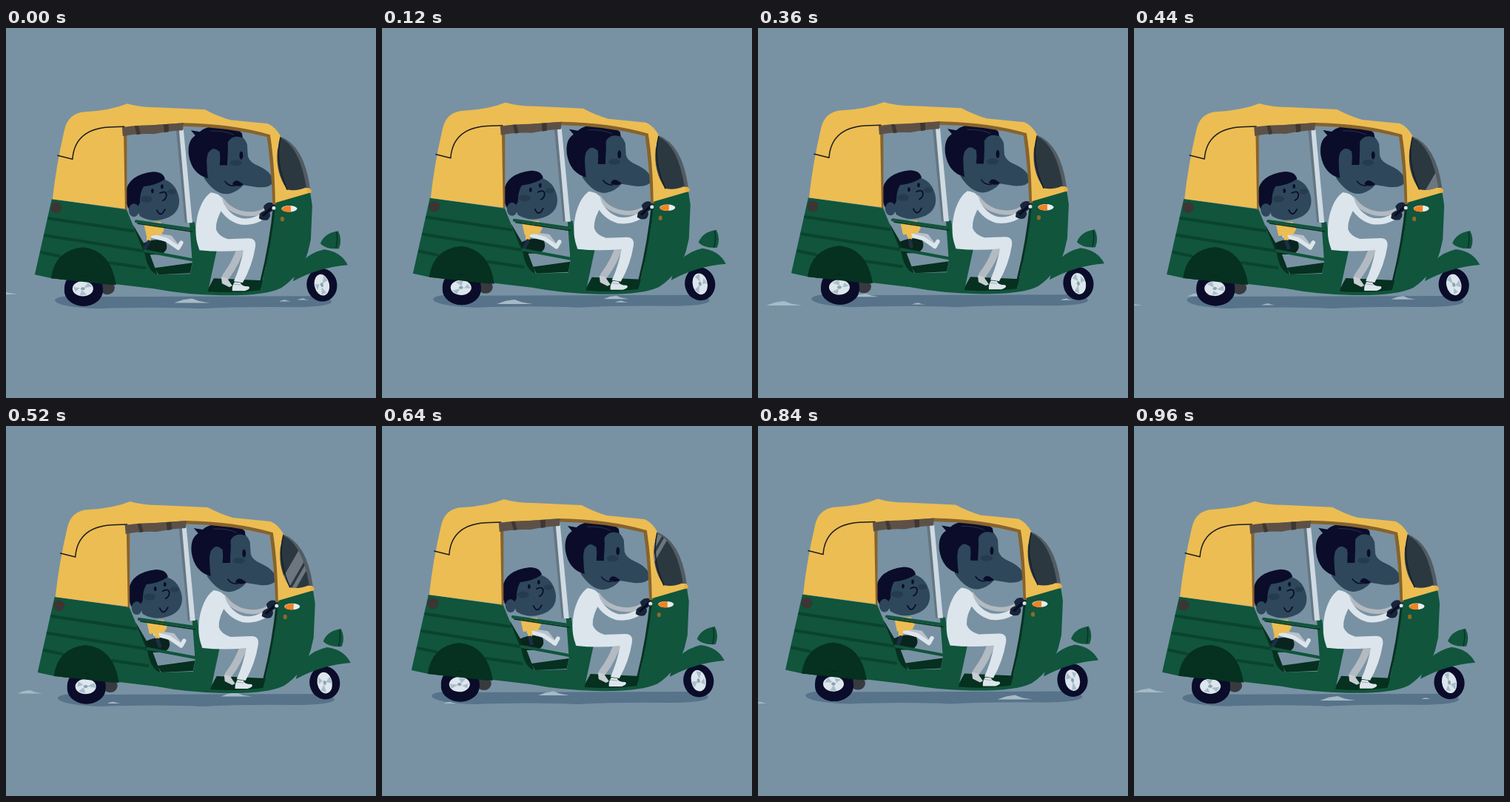
An HTML page for the animation above (1 s loop, 500 by 500 pixels).

```html
<!DOCTYPE html>
<html lang="en">
<head>
<meta charset="utf-8">
<title>Auto rickshaw ride</title>
<style>
html, body { margin: 0; width: 100%; height: 100%; overflow: hidden; background: #7892a3; }
svg { display: block; width: 100%; height: 100%; }
.green { fill: #10553c; }
.deep { fill: #06301f; }
.navy { fill: #0a0c2a; }
.skin { fill: #2e475b; }
.blush { fill: #263b4e; }
.white { fill: #dce5ec; }
.yellow { fill: #ecbd53; }
.line { fill: none; stroke-linecap: round; stroke-linejoin: round; }
</style>
</head>
<body>
<svg viewBox="0 0 500 500">
  <defs>
    <path id="glass" d="M371 148 Q397 160 406 215 Q392 221 380 218 Q364 195 367 165 Z"/>
    <clipPath id="pane"><use href="#glass"/></clipPath>
    <g id="hub">
      <circle r="10" fill="#dce6ec"/>
      <path d="M1 -1 L5 -8 L9 -3 Z M-1 2 L-3 9 L4 8 Z M-3 -1 L-9 -2 L-7 4 Z" fill="#a9bdca"/>
      <circle r="2" fill="#8aa2b2"/>
    </g>
  </defs>

  <path id="shadow" fill="#57738a" d="M66 368 Q68 360 105 363 L425 362 Q440 365 440 370 Q436 377 385 377 Q320 376 262 379 Q200 376 125 379 Q70 377 66 368 Z"/>
  <g id="streaks" fill="#a6bac7"></g>

  <g id="car">
    <ellipse cx="137" cy="351" rx="10" ry="9" fill="#383a40"/>
    <ellipse class="navy" cx="105" cy="351.500" rx="26" ry="24"/>

    <!-- cabin floor and seat -->
    <path class="deep" d="M270 358 L281 338 L348 341 L343 357 Z"/>
    <path class="deep" d="M172 266 L186 290 L194 304 L205 333 L188 334 Z"/>
    <path fill="#09241d" d="M185 291 Q204 282 216 289 Q221 300 209 306 L192 306 Z"/>

    <!-- child -->
    <path class="skin" d="M177 216 Q184 201 209 203 Q230 207 234 230 Q236 247 221 255 Q200 265 181 254 Q174 240 177 216 Z"/>
    <path class="navy" d="M162 222 Q165 198 199 194 Q213 194 215 204 Q204 212 186 214 Q181 222 181 236 L177 243 Q169 237 168 248 Q160 235 162 222 Z"/>
    <ellipse class="skin" cx="173" cy="246" rx="7" ry="9"/>
    <ellipse class="blush" cx="190" cy="231" rx="8" ry="4.500"/>
    <ellipse class="blush" cx="224" cy="221" rx="6" ry="3.500"/>
    <g class="navy"><ellipse cx="198" cy="220" rx="1.800" ry="3"/><ellipse cx="211" cy="214" rx="1.800" ry="3"/></g>
    <path class="line" d="M208 223 Q216 219 217 225 Q217 231 212 233 M204 246 Q209 257 215 245" stroke="#0a0c2a" stroke-width="1.700"/>
    <path class="line" d="M201 280 L222 283 L232 296" stroke="#b9c2ca" stroke-width="6"/>
    <path class="line" d="M198 281 L217 286 L233 297 L237 290" stroke="#dce5ec" stroke-width="5.500"/>
    <path class="yellow" d="M186 262 L209 262 L214 272 L210 279 L190 281 Z"/>
    <path id="sleeve" class="line" stroke="#ecbd53" stroke-width="6"/>
    <path id="forearm" class="line" stroke="#1d2f45" stroke-width="5"/>

    <!-- driver: far limbs -->
    <path class="line" d="M291 231 Q304 249 326 251 Q340 252 350 246" stroke="#b3bac1" stroke-width="6"/>
    <path class="line" d="M318 295 Q312 316 297 336" stroke="#b3bac1" stroke-width="10"/>
    <path d="M291 336 L299 338 L306 348 L302 350 L292 345 Z" fill="#c7cdd2"/>

    <!-- lower body -->
    <path class="green" d="M62 231 L39 333 L62 338 L149 346 L200 352 Q242 360 290 361 Q350 362 372 351 Q398 334 408 303 L412 286 L414 240 L411 220 L364 235 Q359 292 344 354 Q310 359 273 356 L285 300 L261 300 L255 262 L248 262 L252 318 L249 332 L205 333 Q192 329 188 306 L163 245 Z"/>
    <path class="deep" d="M201 324 L252 317 L249 331 L206 333 Z"/>
    <path class="line" d="M58 257 L172 274 M53 280 L185 301 M48 303 L72 308 M140 317 L188 324" stroke="#0b432f" stroke-width="4"/>
    <path class="line" d="M176 261 L252 272 M188 301 L252 313" stroke="#10553c" stroke-width="4"/>
    <path class="line" d="M178 264 L252 275" stroke="#06301f" stroke-width="1.500"/>
    <path class="line" d="M363 237 Q358 290 345 342" stroke="#073122" stroke-width="3"/>
    <path class="deep" d="M61 338 Q66 300 104 296 Q142 300 149 347 Z"/>
    <ellipse class="navy" cx="105" cy="355" rx="26" ry="20.500"/>
    <g transform="translate(104 352) scale(1.4 1.02)"><use href="#hub" class="spin"/></g>
    <path class="deep" d="M70 335 L144 335 L143 347 L71 339 Z"/>
    <circle cx="68" cy="242.500" r="7.500" fill="#3b3634"/>

    <!-- driver -->
    <path class="skin" d="M282 140 Q318 135 326 157 L327 173 Q329 181 341 186 Q361 195 361 208 Q358 216 340 215 L321 212 Q312 222 300 224 Q284 226 268 203 L270 160 Z"/>
    <path class="navy" d="M247 171 Q245 152 256 145 L250 138 L262 140 Q270 132 290 132 Q311 133 319 142 L320 148 Q306 143 300 154 L299 185 L290 185 L289 167 Q281 159 273 169 Q270 180 273 203 Q251 197 247 171 Z"/>
    <path class="line" d="M277 139 Q295 138 308 144" stroke="#27344c"/>
    <ellipse class="skin" cx="281" cy="179" rx="9.500" ry="16"/>
    <path class="navy" d="M290 164 L300 160 L299 185 L289 185 Z"/>
    <ellipse class="navy" cx="318" cy="172" rx="2.400" ry="5.500"/>
    <ellipse class="blush" cx="311" cy="182" rx="8" ry="4"/>
    <path class="navy" d="M306 211 Q309 204 315 207 L321 211 Q315 216 306 211 Z"/>
    <path class="line" d="M296 207 Q301 214 309 213" stroke="#0a0c2a" stroke-width="1.500"/>
    <path class="white" d="M277 222 Q288 223 292 230 L295 240 Q283 258 284 272 Q287 281 300 285 L328 284 Q339 284 337 296 Q333 321 320 344 L308 342 Q317 322 321 300 Q290 303 262 300 Q253 281 259 253 Q265 230 277 222 Z"/>
    <path class="line" d="M288 234 Q298 256 317 261 Q331 263 344 256" stroke="#dce5ec" stroke-width="8.500"/>
    <path class="white" d="M309 343 L317 344 Q318 349 328 349 Q332 352 323 355 L306 355 Q305 349 309 343 Z"/>
    <path class="line" d="M308 346 L317 347" stroke="#9eacb7"/>
    <g fill="#172439">
      <path d="M343 251 Q348 245 355 247 Q360 253 354 259 Q347 261 342 257 Z"/>
      <path d="M348 241 Q353 234 360 236 L364 244 L357 249 L350 247 Z"/>
    </g>
    <path class="line" d="M348 253 L361 241" stroke="#080b22" stroke-width="3"/>
    <circle cx="362" cy="243" r="2.500" fill="#d7e2ea"/>

    <!-- roof and posts -->
    <path d="M230 137 L235 137 L246 263 L242 263 Z" fill="#657683"/>
    <path d="M234 137 L240 137 L252 263 L245 263 Z" fill="#cfdae3"/>
    <path class="line" d="M161 243 L161 136 Q200 130 240 130 Q300 131 355 145 Q361 185 363 236" stroke="#87632c" stroke-width="5"/>
    <path class="yellow" d="M63 231 Q68 185 79 138 Q84 114 108 113 Q142 111 164 102 Q181 107 204 107 L269 110 Q286 119 303 124 L354 129 Q364 133 372 147 L409 213 L412 222 L364 236 Q363 180 357 144 Q305 129 240 128 L159 134 L161 244 Z"/>
    <path class="line" d="M70 172 L90 177 C92 150 108 134 145 133.500 L160 133" stroke="#1d1d20" stroke-width="1.500"/>
    <path d="M157 134 Q175 131 197 131 L240 128 L239 138 Q218 139 200 143 Q178 142 158 146 Z" fill="#5d5147"/>
    <path d="M174 132 L179 132 L182 143 L177 144 Z M213 130 L220 130 L220 140 L214 141 Z" fill="#3e3733"/>
    <path d="M370 146 Q403 158 411 216 L405 216 Z" fill="#535c63"/>
    <use href="#glass" fill="#2c3840"/>
    <g clip-path="url(#pane)">
      <path id="gleam" d="M18 -45 L34 -45 L-18 45 L-34 45 Z M38 -45 L44 -45 L-8 45 L-14 45 Z" fill="#98a1a7" opacity=".6"/>
    </g>
    <path d="M371 148 Q363 180 380 218" class="line" stroke="#171e29" stroke-width="1.500"/>
    <circle cx="410" cy="220" r="2.800" fill="#f0ad3b"/>

    <!-- front details -->
    <ellipse cx="383" cy="244" rx="10.500" ry="4.200" fill="#e8edec"/>
    <path d="M385 240 Q374 240 372.500 245 Q376 249 385 248 Z" fill="#f28222"/>
    <ellipse cx="373.500" cy="258" rx="2.600" ry="3.200" fill="#8b6a28"/>
    <path class="green" d="M449 274 Q430 277 425 291 Q432 299 450 298 Q455 286 449 274 Z"/>
    <path class="line" d="M447 276 Q449 286 446 297" stroke="#073425" stroke-width="1.500"/>
    <g transform="translate(427 347) rotate(-12)">
      <ellipse class="navy" rx="20.500" ry="22.500"/>
      <g transform="scale(1 1.45)"><use href="#hub" class="spin"/></g>
    </g>
    <path class="green" d="M388 342 Q395 307 430 299 Q453 302 462 320 Q423 323 388 342 Z"/>
  </g>
</svg>
<script>
const $ = id => document.getElementById(id);
const LOOP = 1000, STEP = 40, TAU = 2 * Math.PI;

// start in ms, speed in px/ms, full width, sideways drift over the crossing
const streaks = [
  { start: 340, speed: .66, width: 42, drift: -8 },
  { start: 702, speed: .6, width: 48, drift: 7 },
  { start: 960, speed: .71, width: 34, drift: -7 },
  { start: 881, speed: .445, width: 18, drift: 7 }
];

for (const s of streaks) {
  s.path = document.createElementNS("http://www.w3.org/2000/svg", "path");
  $("streaks").append(s.path);
}
const hubs = document.querySelectorAll(".spin");

const move = (id, x, y) => $(id).setAttribute("transform", `translate(${x} ${y})`);

function drawStreak({ start, speed, width, drift, path }, t) {
  const age = (t - start + LOOP) % LOOP;
  const x = 430 - speed * age;
  const y = 368 + drift * Math.min(1, age / 600);
  const w = width * Math.min(1, .3 + age / 200);
  const h = Math.min(6, w * .13);
  path.setAttribute("d", `M${x - w / 2} ${y} l${w * .25} ${-h * .7} l${w * .25} ${-h * .3} l${w * .2} ${h * .6} l${w * .3} ${h * .4} Z`);
}

function draw(t) {
  const turn = TAU * t / LOOP;
  const x = 2 + 4 * Math.sin(turn - .09 * TAU);
  const y = 2.1 * Math.cos(2 * turn) + .8 * Math.sin(turn) - 1.9;
  move("car", x, y);
  move("shadow", x, y);

  const hand = 196 - 8 * Math.cos(turn);
  const elbow = 193 + (hand - 188) / 2;
  $("sleeve").setAttribute("d", `M195 268 L${elbow} 285`);
  $("forearm").setAttribute("d", `M${elbow} 289 L${hand} 297`);

  move("gleam", 390 - (t - 520) * .33, 185);
  hubs.forEach(h => h.setAttribute("transform", `rotate(${t / LOOP * 1440})`));
  streaks.forEach(s => drawStreak(s, t));
}

const begin = performance.now();
function tick() {
  const t = (performance.now() - begin) % LOOP;
  draw(Math.floor(t / STEP) * STEP);
  requestAnimationFrame(tick);
}
draw(0);
requestAnimationFrame(tick);
</script>
</body>
</html>
```
